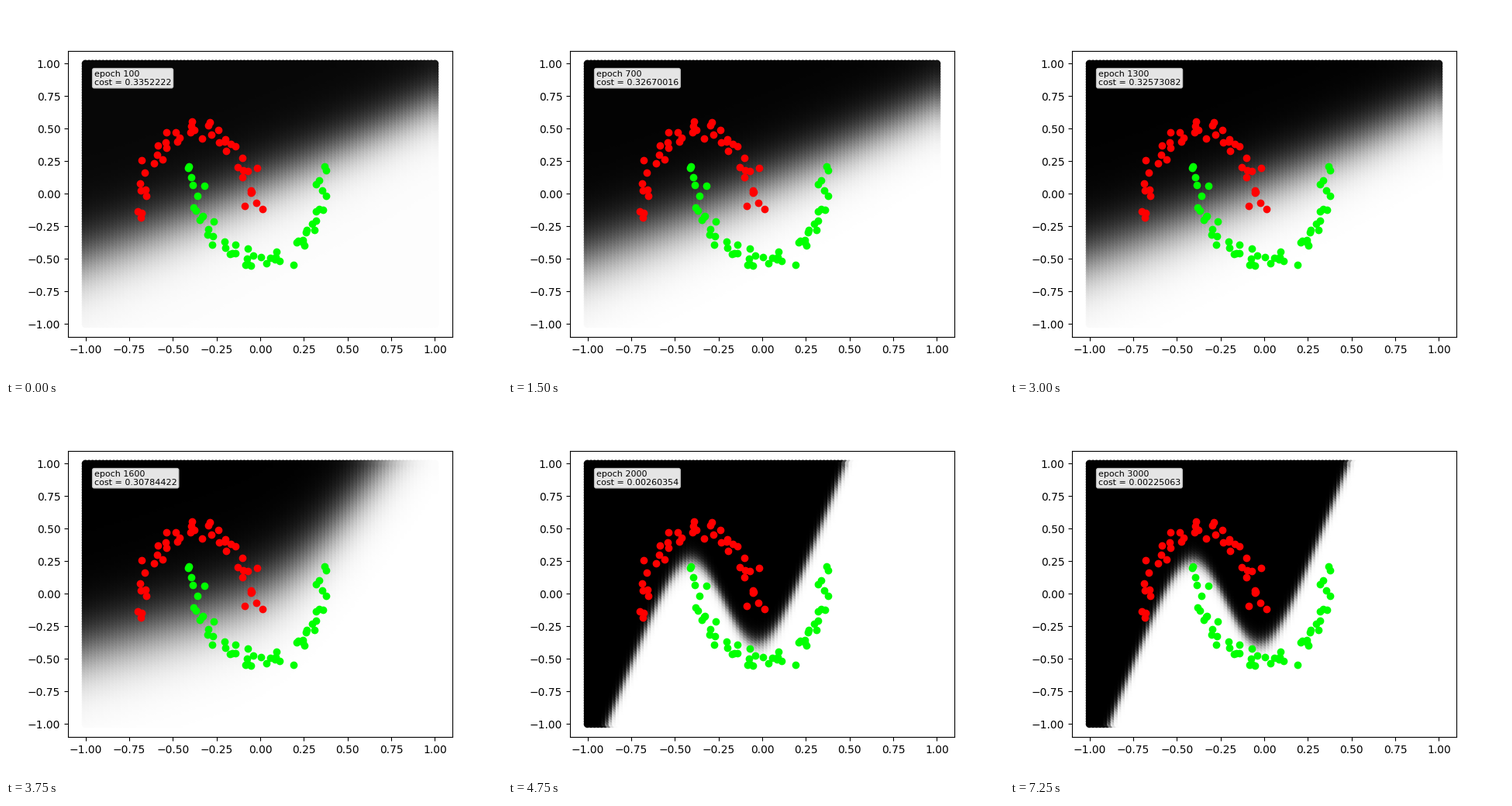
Animation of 640x480 px, one loop 7500 ms. Source, as a matplotlib script:

```python
import numpy as np
import matplotlib.pyplot as plt
from matplotlib.animation import FuncAnimation

STEP, FRAMES, INTERVAL = 100, 30, 250

# Cost at a few epochs, interpolated over the logarithm of the epoch
COSTS = {100: 0.3352222, 500: 0.32736882, 900: 0.32620073, 1300: 0.32573082,
         1600: 0.30784422, 1700: 0.01473518, 2000: 0.00260354,
         3000: 0.00225063}

# Grid drawn column by column, so each column overlaps the one to its left
axis = np.linspace(-1, 1, 100)
X, Y = (g.ravel() for g in np.meshgrid(axis, axis, indexing="ij"))


def moon(rng, count, center, radius):
    """Noisy half ellipse; a negative vertical radius opens it upwards."""
    angle = np.linspace(0, np.pi, count)
    x = center[0] + radius[0] * np.cos(angle) + rng.normal(0, 0.022, count)
    y = center[1] + radius[1] * np.sin(angle) + rng.normal(0, 0.04, count)
    return x, y


def softplus(x, width):
    return width * np.logaddexp(0, x / width)


def straight():
    """Nearly linear boundary of the early epochs."""
    edge = 0.07 + 0.605 * X + 0.045 * X**2
    return (8.2 + X) * (edge - Y)


def bent():
    """Boundary turning upwards on the right."""
    edge = -0.43 + 0.4 * (X + 1) + 1.5 * softplus(X - 0.2, 0.15)
    return 7 * (edge - Y)


def curved(late):
    """S-shaped boundary that separates the two moons."""
    edge = (1.986 + 3.4 * X - 7.4 * softplus(X + 0.387, 0.08)
            + (7.5 - 0.05 * late) * softplus(X + 0.025, 0.08))
    return (30 + 2 * late) * (edge - Y)


def predict(epoch):
    bend = np.clip((epoch - 1300) / 300, 0, 1) ** 3
    split = 1 - 0.4 ** max(0, (epoch - 1600) / 100)
    late = max(0, (epoch - 2000) / 1000)
    z = (1 - bend) * straight() + bend * bent()
    z = (1 - split) * z + split * curved(late)
    low = np.interp(epoch, [100, 500, 1800], [0.028, 0.015, 0])
    high = np.interp(epoch, [100, 500], [0.99, 1])
    return low + (high - low) / (1 + np.exp(-z))


def caption(epoch):
    cost = np.interp(np.log(epoch), np.log(list(COSTS)),
                     list(COSTS.values()))
    return f"epoch {epoch}\ncost = " + f"{cost:.8f}".rstrip("0")


fig, ax = plt.subplots(figsize=(6.4, 4.8), dpi=100)
ax.set_xlim(-1.1, 1.1)
ax.set_ylim(-1.1, 1.1)
field = ax.scatter(X, Y, c=predict(STEP), cmap="gray", vmin=0, vmax=1)

rng = np.random.default_rng(3)
ax.scatter(*moon(rng, 46, (-0.355, -0.17), (0.325, 0.68)), color="#ff0000")
ax.scatter(*moon(rng, 55, (-0.01, 0.19), (0.375, -0.73)), color="#00ff00")

label = ax.text(-0.95, 0.95, caption(STEP), fontsize=8, va="top",
                linespacing=1.1,
                bbox=dict(boxstyle="round,pad=0.2", fc="white", ec="0.8",
                          alpha=0.9))


def update(i):
    epoch = STEP * (i + 1)
    field.set_array(predict(epoch))
    label.set_text(caption(epoch))
    return field, label


anim = FuncAnimation(fig, update, frames=FRAMES, interval=INTERVAL,
                     repeat=True, repeat_delay=0)
plt.show()
```
